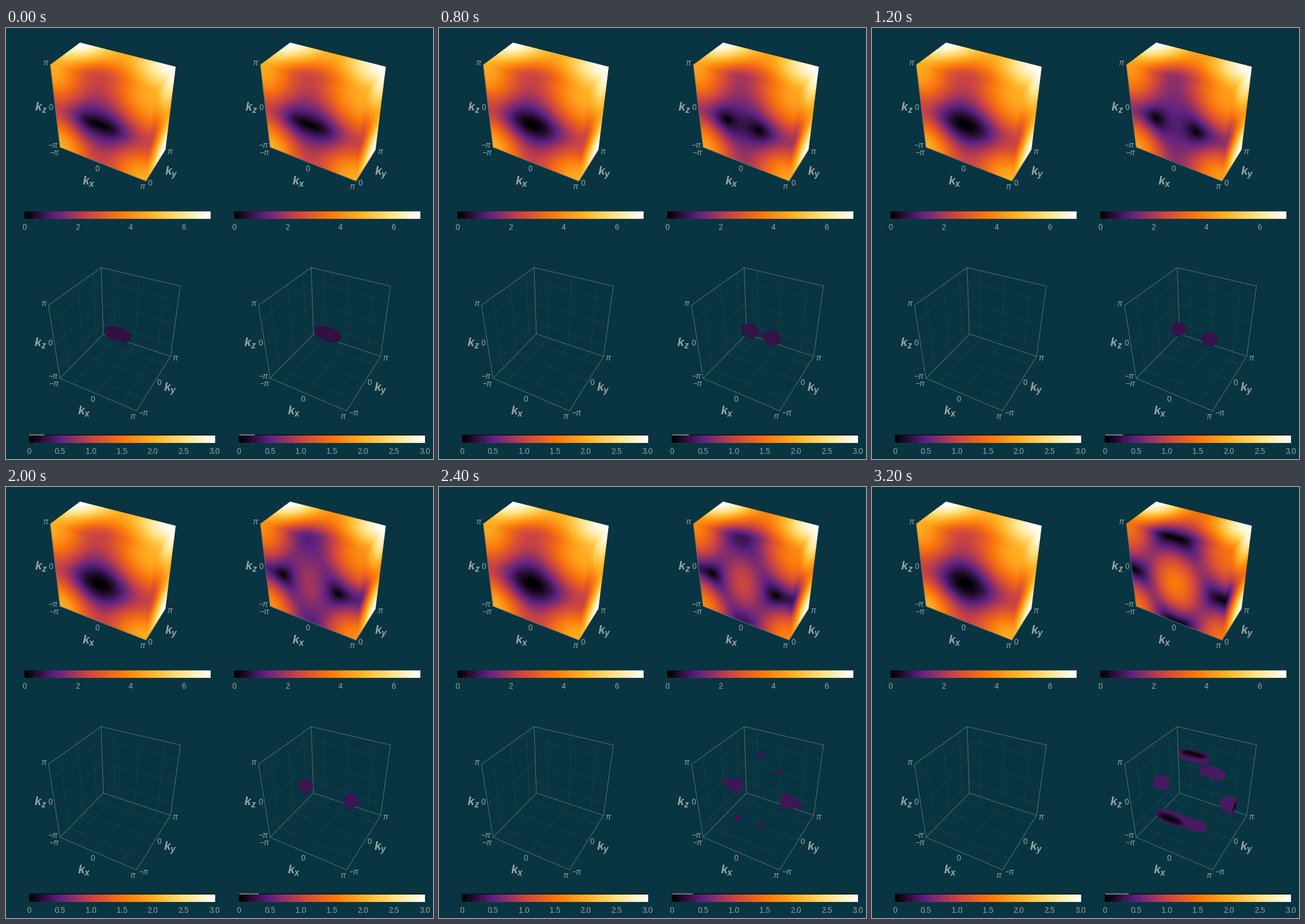
Recreate the animation shown at these times as a matplotlib script. Size 745 px wide and 752 px high, loop 3600 ms.

```python
from itertools import combinations, product

import numpy as np
import matplotlib.pyplot as plt
from matplotlib.animation import FuncAnimation
from matplotlib.colors import LinearSegmentedColormap

W, H, DPI = 745, 752, 100
FRAMES, STEP = 9, 400
SHIFT = 366.6       # distance between the two columns
PULL = 2.04         # final strength of the mass shift
CUT = .505          # gap below which a pocket is shown
BG, INK, LINE = "#083541", "#98a5a7", "#65757a"

SUNSET = LinearSegmentedColormap.from_list("sunset", [
    (0, 0, 0), (.373, .136, .507), (.788, .26, .271), (.979, .451, .051),
    (1, .683, .13), (1, .882, .491), (1, 1, 1)], N=512)


def corners(lo, hidden):
    """Box corners in units of pi, ky starting at lo, without the hidden one."""
    return [k for k in product((-1, 1), (lo, 1), (-1, 1)) if k != hidden]


def camera(keys, places):
    """Least-squares 3x4 projection that puts each key at its place."""
    rows, rhs = [], []
    for k, place in zip(keys, places):
        for axis, p in enumerate((np.array(place) - (185, 300)) / 150):
            row = np.zeros(11)
            row[4 * axis:4 * axis + 4] = *k, 1
            row[8:] = -p * np.array(k)
            rows.append(row)
            rhs.append(p)
    p = np.linalg.lstsq(np.array(rows), np.array(rhs), rcond=None)[0]
    back = np.array([[150, 0, 185], [0, 150, 300], [0, 0, 1]])
    return back @ np.append(p, 1).reshape(3, 4)


def project(cam, k):
    x, y, w = cam @ np.append(k, 1)
    return np.array([x / w, y / w])


CUBE = camera(corners(0, (-1, 1, -1)), [
    (94, 208), (77, 64), (129.5, 25.5), (244.5, 267), (257, 117), (278, 213), (296, 67)])
BOX_CORNERS = corners(-1, (1, -1, 1))
BOX = camera(BOX_CORNERS, [
    (94, 611), (74, 484), (170, 534), (166, 418), (228, 668), (287, 573), (304, 450)])


def bands(k):
    """Mass term and squared transverse part of the two-band model."""
    k = np.pi * k
    mass = 3 - np.cos(k).sum(-1)
    side = (np.sin(k[..., 1:]) ** 2).sum(-1)
    return mass.astype(np.float32), side.astype(np.float32)


def gap(field, g):
    return np.sqrt((field[0] - g) ** 2 + field[1])


def pixels(x0, y0, w, h, sub, off):
    x = x0 - off + (np.arange(w * sub) + .5) / sub
    y = y0 + (np.arange(h * sub) + .5) / sub
    gx, gy = np.meshgrid(x, y)
    return np.stack([gx, gy, np.ones_like(gx)], -1)


def canvas(x0, y0, w, h, z):
    return ax.imshow(np.zeros((h, w, 4)), interpolation="nearest", zorder=z,
                     extent=(x0, x0 + w, y0 + h, y0))


class Cube:
    """Gap painted on the three visible faces, scaled from its least to its largest."""
    faces = [((-1, 0, -1), (2, 0, 0), (0, 0, 2)),
             ((1, 0, -1), (0, 1, 0), (0, 0, 2)),
             ((-1, 0, 1), (2, 0, 0), (0, 1, 0))]

    def __init__(self, off):
        self.w, self.h = 250, 265
        area = 60 + round(off), 15, self.w, self.h
        pix = pixels(*area, 2, off)
        k = np.zeros_like(pix)
        self.mask = np.zeros(pix.shape[:2], bool)
        for o, a, b in map(np.array, self.faces):
            hom = np.stack([CUBE[:, :3] @ a, CUBE[:, :3] @ b,
                            CUBE @ np.append(o, 1)], 1)
            q = pix @ np.linalg.inv(hom).T
            u, v = q[..., :1] / q[..., 2:], q[..., 1:2] / q[..., 2:]
            hit = ((u >= 0) & (u <= 1) & (v >= 0) & (v <= 1))[..., 0]
            k[hit] = (o + u * a + v * b)[hit]
            self.mask |= hit
        self.field = bands(k)
        self.im = canvas(*area, 2)

    def paint(self, g):
        least, most = max(0, -g), 6 - g
        val = (gap(self.field, g) - least) / (most - least)
        rgba = SUNSET(val) * self.mask[..., None]
        rgba = rgba.reshape(self.h, 2, self.w, 2, 4).mean((1, 3))
        rgba[..., :3] /= np.maximum(rgba[..., 3:], .01)
        self.im.set_data(np.clip(rgba, 0, 1))


class Pocket:
    """Region of small gap inside the box, found along each view ray."""

    def __init__(self, off):
        area = 70 + round(off), 414, 238, 258
        inv = np.linalg.inv(BOX[:, :3])
        eye = -inv @ BOX[:, 3]
        ray = pixels(*area, 1, off) @ inv.T
        ray /= np.linalg.norm(ray, axis=-1, keepdims=True)
        ray *= np.sign(-(ray @ eye))[..., None]
        t = np.stack([(-1 - eye) / ray, (1 - eye) / ray])
        near, far = t.min(0).max(-1), t.max(0).min(-1)
        self.inside = far > near
        far = np.maximum(near, far)
        parts = [bands(eye + (near + s * (far - near))[..., None] * ray)
                 for s in np.linspace(0, 1, 72)]
        self.field = tuple(np.stack(p) for p in zip(*parts))
        self.im = canvas(*area, 4)

    def paint(self, g):
        e = gap(self.field, g)
        rgba = SUNSET(np.minimum(e[0], CUT) / (6 - g))
        rgba[..., 3] = np.clip((CUT - e.min(0)) / .01 + .5, 0, 1) * self.inside
        self.im.set_data(rgba)


fig = plt.figure(figsize=(W / DPI, H / DPI), dpi=DPI, facecolor=BG)
ax = fig.add_axes([0, 0, 1, 1])
ax.axis("off")


def put(x, y, s, px=13.5, ha="center", **kw):
    ax.text(x, y, s, fontsize=px * 72 / DPI, color=INK, family="Liberation Sans",
            ha=ha, va="center", zorder=6, **kw)


def seg(cam, off, *ks, **kw):
    x, y = np.array([project(cam, k) for k in ks]).T
    ax.plot(x + off, y, **(dict(color=LINE, lw=.65, zorder=3) | kw))


def label_axes(cam, lo, off):
    """Tick labels and names beside the three labelled edges."""
    edges = [("x", lambda v: (v, lo, -1), -1, "right", (-2, 10), (-22, 31)),
             ("y", lambda v: (1, v, -1), lo, "left", (3.5, 3.5), (25, 12)),
             ("z", lambda v: (-1, lo, v), -1, "right", (-4, -3), (-26, -4))]
    for name, at, start, ha, gap_px, name_px in edges:
        for v, s in zip((-1, 0, 1), ("−π", "0", "π")):
            if v >= start:
                x, y = project(cam, at(v)) + gap_px
                put(x + off, y, s, ha=ha, style="italic" if v else "normal")
        x, y = project(cam, at((start + 1) / 2)) + name_px
        bold = dict(weight="bold", style="italic")
        put(x + off - 4, y, "k", 21, **bold)
        put(x + off + 5.5, y + 5, name, 15.5, **bold)


def colorbar(x, y, top, step, fmt):
    ax.imshow(np.linspace(0, 1, 325)[None], cmap=SUNSET, zorder=2,
              interpolation="nearest", extent=(x - .5, x + 324.5, y + 12, y - 1))
    for v in np.arange(0, top + .01, step / 5):
        ax.plot([x + 324 * v / top] * 2, [y + 10.5, y + 12], color=LINE, lw=.5, zorder=3)
    for v in np.arange(0, top + .01, step):
        put(x + 324 * v / top, y + 27, fmt.format(v) if v else "0")


def panel(off):
    seg(CUBE, off, (-1, 0, 1), (-1, 0, -1), (1, 0, -1), (1, 1, -1))
    label_axes(CUBE, 0, off)
    colorbar(32 + off, 321, 7, 2, "{:.0f}")

    for a, b in combinations(BOX_CORNERS, 2):
        if sum(p != q for p, q in zip(a, b)) == 1:
            seg(BOX, off, a, b)
    faint = dict(lw=.6, alpha=.5, ls=(0, (1, 1.6)), zorder=2)
    for v in np.array([-2, 0, 2]) / np.pi:
        seg(BOX, off, (v, -1, -1), (v, 1, -1), (v, 1, 1), **faint)
        seg(BOX, off, (1, v, -1), (-1, v, -1), (-1, v, 1), **faint)
        seg(BOX, off, (-1, -1, v), (-1, 1, v), (1, 1, v), **faint)
    label_axes(BOX, -1, off)
    colorbar(40 + off, 712, 3, .5, "{:.1f}")
    ax.plot([40 + off, 364 + off], [710.3] * 2, color="#03161d", lw=1.3, zorder=2)
    mark, = ax.plot([], [], color="#747b7d", lw=1.5, zorder=3, solid_capstyle="butt")
    return Cube(off), Pocket(off), mark, 40 + off


left, right = panel(0), panel(SHIFT)
ax.set_aspect("auto")
ax.set_xlim(0, W)
ax.set_ylim(H, 0)


def draw(i):
    pull = PULL * i / (FRAMES - 1)
    for (cube, pocket, mark, x), g in ((left, -pull), (right, pull)):
        cube.paint(g)
        pocket.paint(g)
        mark.set_data([x, x + 324 * CUT / (6 - g)], [710.3] * 2)
        mark.set_visible(-g < CUT)
    return []


anim = FuncAnimation(fig, draw, frames=FRAMES, interval=STEP, repeat=True,
                     repeat_delay=0, blit=False)
plt.show()
```
